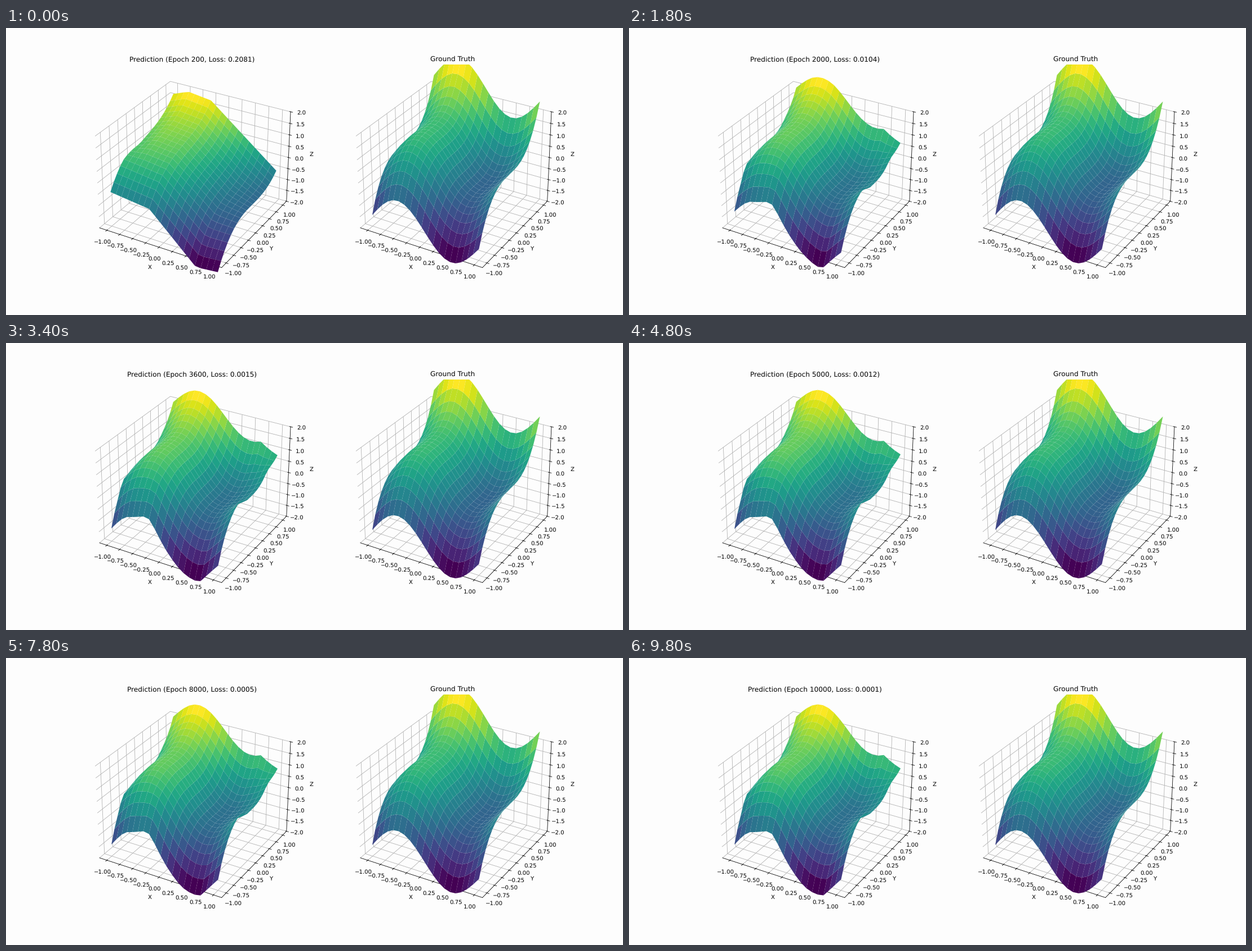
Animation of 1095 by 511 pixels, one loop 10 s. Source, as a matplotlib script:

```python
import numpy as np
import matplotlib.pyplot as plt
from matplotlib.animation import FuncAnimation

BG = "#fdfdfd"
FRAMES, INTERVAL = 50, 200
# Training step: loss, joined on a log scale
LOSS = {0: 0.2081, 9: 0.0104, 17: 0.0015, 24: 0.0012,
        34: 0.0007, 45: 0.0004, 49: 0.0001}

plt.rcParams["text.hinting"] = "none"

axis = np.linspace(-1, 1, 20)
X, Y = np.meshgrid(axis, axis)


def relu(v):
    return np.maximum(v, 0)


def tent(v, width):
    """Piecewise linear bump of height 1 around v = 0."""
    return relu(1 - np.abs(v) / width)


def truth_surface():
    return 2 * Y**3 - np.sin(np.pi * X) + 0.5


def early_surface():
    """Rough first fit: a creased sheet falling along x."""
    profile = 1.5 + 0.55 * Y - 0.25 * Y**2 + 0.7 * Y**3
    slope = 1.55 + 0.4 * relu(-Y) ** 2
    left_fold = 1.2 * relu(-0.7 - X) * np.clip(2 * Y + 1.2, 0, 1)
    return (profile - 0.47 - 0.3 * (X + 1) - slope * relu(X + 0.26)
            + 1.25 * (1 - Y) * relu(X - 0.6) - left_fold)


def final_surface():
    """Truth flattened at the back and right, creased at the front and left."""
    back = relu((Y - 0.6) / 0.4) ** 1.5
    back_drop = back * (-0.5 + 0.2 * np.sin(np.pi * X) - 2.3 * relu(X - 0.68))
    side_drop = -1.1 * relu(X - 0.7) * np.clip(4 * Y + 1.2, 0, 1)
    front_crease = tent(Y + 1, 0.5) * (0.3 * tent(X + 0.26, 0.25)
                                       - 0.1 * tent(X + 0.55, 0.2)
                                       - 0.13 * tent(X - 0.68, 0.15))
    left_crease = 0.2 * tent(Y + 0.62, 0.18) * tent(X + 1, 0.4)
    return truth + back_drop + side_drop + front_crease + left_crease


truth = truth_surface()
early = early_surface()
final = final_surface()
overshoot = -0.9 * tent(X - 0.6, 0.25) * tent(Y + 1, 0.5)


def prediction(step):
    rest = (1 + step / 4) ** -1.6
    return final + (early - final) * rest + overshoot * rest * (1 - rest)


def loss(step):
    return np.exp(np.interp(step, list(LOSS), np.log(list(LOSS.values()))))


def make_axes(index):
    ax = fig.add_subplot(1, 2, index, projection="3d")
    ax.set_facecolor(BG)
    for side in (ax.xaxis, ax.yaxis, ax.zaxis):
        side.set_pane_color(BG, alpha=1)
    ax.set(xlabel="X", ylabel="Y", zlabel="Z", zlim=(-2, 2))
    return ax


fig = plt.figure(figsize=(15, 7), dpi=73, facecolor=BG)
left, right = make_axes(1), make_axes(2)
right.plot_surface(X, Y, truth, cmap="viridis")
right.set_title("Ground Truth")


def update(step):
    for surface in list(left.collections):
        surface.remove()
    left.plot_surface(X, Y, prediction(step), cmap="viridis")
    left.set_title(f"Prediction (Epoch {200 * (step + 1)}, "
                   f"Loss: {loss(step):.4f})")


anim = FuncAnimation(fig, update, frames=FRAMES, interval=INTERVAL, repeat=True)
plt.show()
```
